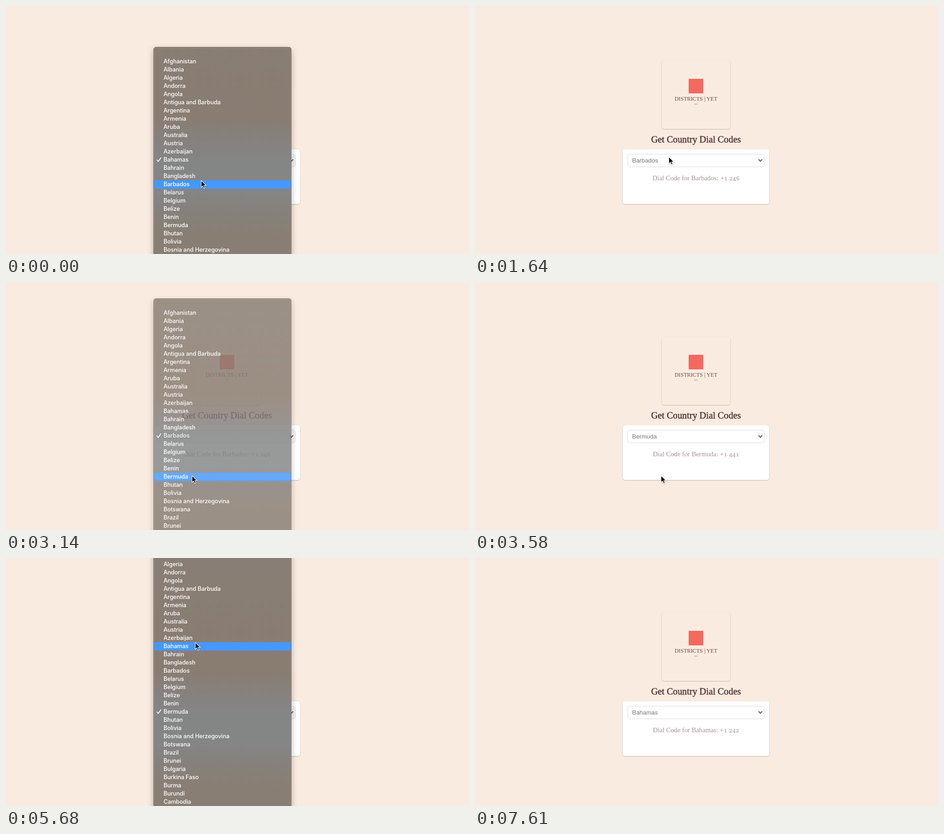
These frames come from a looping animation (1014 px wide and 545 px high, 7.9 s). An HTML page:

```html
<!DOCTYPE html>
<html lang="en">
<head>
<meta charset="utf-8">
<title>Country dial codes</title>
<style>
  html, body { margin: 0; width: 100%; height: 100%; overflow: hidden; background: #faebe0; }
  svg { display: block; width: 1014px; height: 545px; }
  .serif { font-family: "Liberation Serif", serif; text-anchor: middle; }
  .num { font-family: "Noto Serif", serif; font-size: 13px; font-variant-numeric: oldstyle-nums; }
  #value { font: 13.33px "Liberation Sans", sans-serif; fill: #757575; }
  #rows { font: 500 12.6px Inter, sans-serif; letter-spacing: -.08px; fill: #fff; }
</style>
</head>
<body>
<svg viewBox="0 0 1014 545">
  <defs>
    <linearGradient id="glass" gradientUnits="userSpaceOnUse" x1="0" y1="0" x2="0" y2="545">
      <stop offset="0" stop-color="#897e74"/>
      <stop offset=".46" stop-color="#897d72"/>
      <stop offset=".55" stop-color="#86817f"/>
      <stop offset=".62" stop-color="#848585"/>
      <stop offset=".75" stop-color="#848585"/>
      <stop offset=".83" stop-color="#86807b"/>
      <stop offset=".93" stop-color="#897e73"/>
    </linearGradient>
    <filter id="lift" x="-10%" y="-10%" width="120%" height="120%">
      <feDropShadow dx="0" dy="1" stdDeviation="1.3" flood-opacity=".22"/>
    </filter>
    <filter id="float" filterUnits="userSpaceOnUse" x="270" y="-120" width="410" height="800">
      <feDropShadow dx="0" dy="5" stdDeviation="6.5" flood-opacity=".3"/>
    </filter>
    <filter id="tip" x="-40%" y="-40%" width="180%" height="180%">
      <feDropShadow dx="0" dy="1" stdDeviation=".8" flood-opacity=".35"/>
    </filter>
  </defs>

  <rect width="1014" height="545" fill="#faebe0"/>

  <rect x="409" y="120" width="150" height="150" rx="5" fill="#faebe0" filter="url(#lift)"/>
  <rect x="468" y="160" width="32" height="32" fill="#f4695f"/>
  <text class="serif" x="484" y="207.5" font-size="12.2" fill="#6a4a48">DISTRICTS | YET</text>
  <text class="serif" x="484" y="216.5" font-size="4" letter-spacing=".8" fill="#6a4a48">API</text>
  <text class="serif" x="484" y="300" font-size="20.3" fill="#4f2f32" stroke="#4f2f32" stroke-width=".45">Get Country Dial Codes</text>

  <rect x="324" y="315" width="320" height="120" rx="5" fill="#fff" filter="url(#lift)"/>
  <rect id="select" x="334.5" y="325.5" width="299" height="28" rx="4.5" stroke="#dcdcdc"/>
  <text id="value" x="344" y="344"/>
  <path d="M621 337l4 4.3 4-4.3" fill="none" stroke="#5c5c5c" stroke-width="2"/>
  <text id="message" class="serif" x="484" y="383" font-size="14.77" fill="#a98f94"/>

  <g id="menu">
    <rect id="panel" x="323" width="302" height="900" rx="6" fill="url(#glass)" filter="url(#float)"/>
    <rect id="rim" x="323.5" width="301" height="899" rx="5.5" fill="none" stroke="#5f574f" stroke-opacity=".75"/>
    <rect id="shine" x="324.5" width="299" height="897" rx="4.5" fill="none" stroke="#fff" stroke-opacity=".16"/>
    <rect id="bar" x="324" width="300" height="18.5" fill="#4598ff"/>
    <g id="rows"></g>
    <path d="M330.5 338.2l2.9 3.6 5.8-8.3" fill="none" stroke="#fff" stroke-width="1.7" stroke-linecap="round" stroke-linejoin="round"/>
  </g>

  <path id="cursor" d="M.5.5V15.6L4 12.3 6.3 17.7 8.9 16.6 6.6 11.3H11.3Z" fill="#000" stroke="#fff" stroke-width="1.1" filter="url(#tip)"/>
</svg>

<script>
const LOOP = 7900, ROW = 18, PICK_TOP = 329;
const countries = ('Afghanistan,Albania,Algeria,Andorra,Angola,Antigua and Barbuda,Argentina,Armenia,Aruba,' +
  'Australia,Austria,Azerbaijan,Bahamas,Bahrain,Bangladesh,Barbados,Belarus,Belgium,Belize,Benin,Bermuda,' +
  'Bhutan,Bolivia,Bosnia and Herzegovina,Botswana,Brazil,Brunei,Bulgaria,Burkina Faso,Burma,Burundi,Cambodia').split(',');
const codes = { Bahamas: '242', Barbados: '246', Bermuda: '441' };
const BAHAMAS = 12, BARBADOS = 15, BERMUDA = 20;

const at = (t, change) => ({ t, ...change });
const move = (t, x, y, change) => at(t, { x, y, ...change });

// Each step changes part of the state and holds until the next one.
const steps = [
  move(0, 427, 383, { pick: BAHAMAS, hot: BARBADOS, open: 1, ready: true }),
  at(290, { open: .6 }),
  at(440, { open: 0, pick: BARBADOS, ready: false }),
  at(1190, { ready: true }),
  move(1340, 427, 368),
  move(1490, 426, 348),
  move(1640, 424, 331),
  move(1790, 423, 344),
  at(2240, { open: 1 }),
  move(2540, 417, 380, { hot: 17 }),
  move(2690, 407, 425, { hot: BERMUDA }),
  at(2990, { hot: -1 }),
  at(3140, { hot: BERMUDA, open: .83 }),
  at(3290, { open: .25 }),
  at(3430, { open: 0, pick: BERMUDA, ready: false }),
  at(3580, { ready: true }),
  move(4480, 410, 412),
  move(4630, 420, 385),
  move(4780, 433, 355),
  move(4930, 442, 338),
  move(5080, 445, 332),
  at(5380, { open: 1 }),
  move(5530, 430, 258, { hot: 16 }),
  move(5680, 414, 185, { hot: BAHAMAS }),
  at(6120, { open: .6 }),
  at(6270, { open: 0, pick: BAHAMAS, ready: false }),
  move(6420, 416, 218),
  move(6870, 450, 225, { ready: true }),
  move(7020, 700, 310),
  move(7170, 750, 363),
  move(7320, 915, 470),
  move(7460, 985, 523),
  move(7610, 1100, 600)
];
const states = [];
steps.reduce((prev, step) => {
  const state = { ...prev, ...step };
  states.push(state);
  return state;
}, {});

const $ = id => document.getElementById(id);
const set = (id, attrs) => {
  for (const k in attrs) $(id).setAttribute(k, attrs[k]);
};

$('rows').innerHTML = countries
  .map((name, i) => `<text x="345" y="${i * ROW + 13.4}">${name}</text>`).join('');

function draw(s) {
  const name = countries[s.pick], top = PICK_TOP - s.pick * ROW;
  $('value').textContent = name;
  $('message').innerHTML = s.ready
    ? `Dial Code for ${name}: +<tspan class="num">1</tspan> <tspan class="num">${codes[name]}</tspan>`
    : 'Fetching...';
  set('select', { fill: s.open ? '#f5f5f5' : '#fff' });
  set('menu', { opacity: s.open, visibility: s.open ? 'visible' : 'hidden' });
  set('panel', { y: top - 23 });
  set('rim', { y: top - 22.5 });
  set('shine', { y: top - 21.5 });
  set('bar', { y: top + s.hot * ROW, opacity: s.hot < 0 ? 0 : 1 });
  set('rows', { transform: `translate(0 ${top})` });
  set('cursor', { transform: `translate(${s.x} ${s.y})` });
}

let shown;
function tick() {
  const t = performance.now() % LOOP;
  const state = states.findLast(s => s.t <= t);
  if (state !== shown) draw(shown = state);
  requestAnimationFrame(tick);
}
tick();
</script>
</body>
</html>
```
